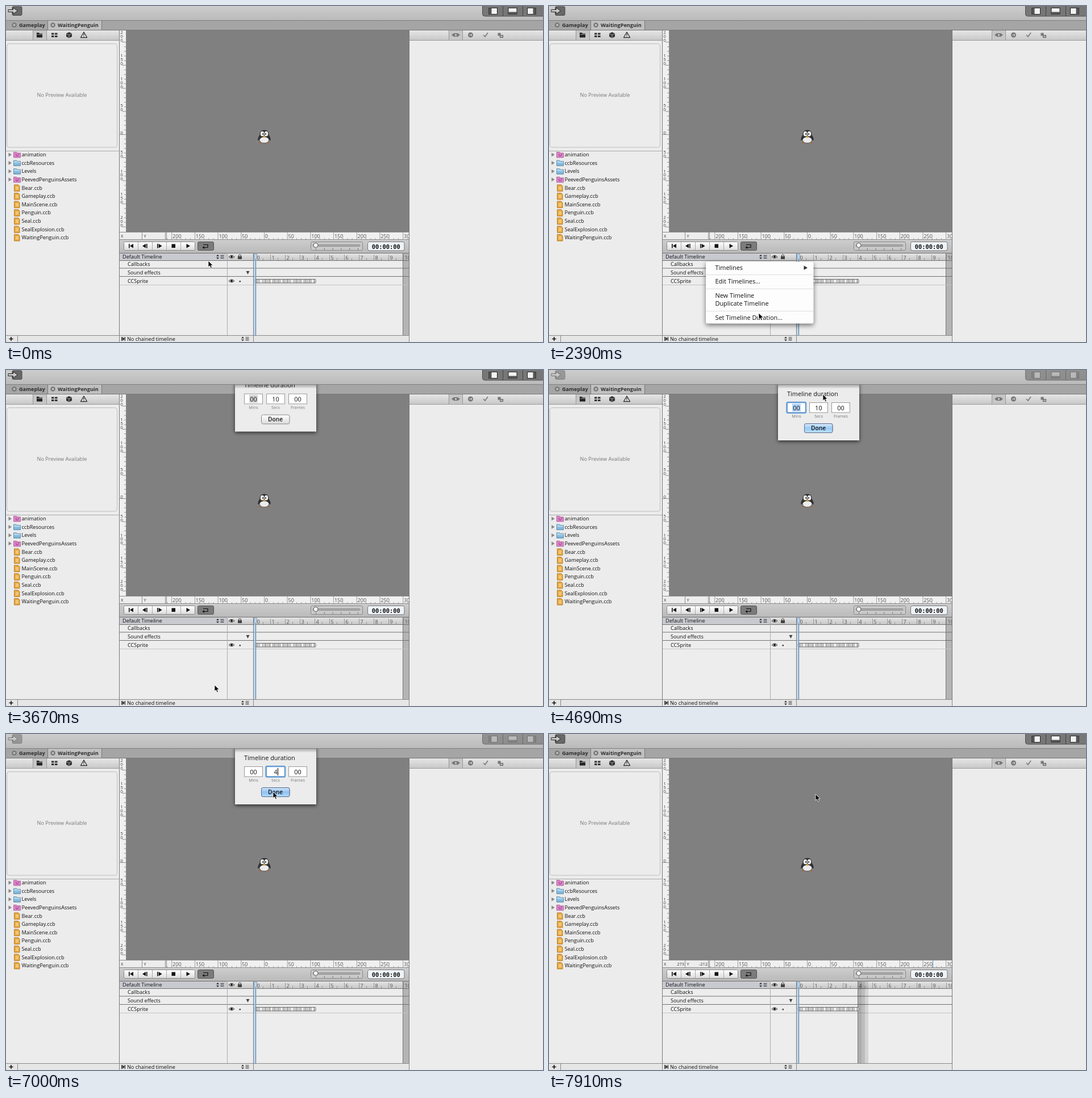
These frames come from a looping animation (945 px wide and 592 px high, 8000 ms). An HTML page:

```html
<!DOCTYPE html>
<html lang="en">
<head>
<meta charset="utf-8">
<title>Timeline duration</title>
<style>
html, body { margin: 0; width: 100%; height: 100%; overflow: hidden; background: #ececec; }
svg { display: block; width: 945px; height: 592px; }
text { font: 500 9.1px "Open Sans", "Noto Sans", sans-serif; fill: #111; white-space: pre; }
.b { font-weight: 700; fill: #2c2c2c; }
.mid { text-anchor: middle; }
.end { text-anchor: end; }
.dim { fill: #777; }
.rule { font-weight: 400; fill: #555; }
.digit { font-size: 8px; fill: #444; text-anchor: middle; }
.xy { font-size: 7.5px; fill: #333; }
.menu { font-size: 10.9px; }
.white text, .white path { fill: #fff; }
.small { font-size: 7.3px; fill: #777; text-anchor: middle; }
.done { font-size: 10.2px; font-weight: 600; text-anchor: middle; }
.mono { font: 700 10.4px "DejaVu Sans Mono", monospace; }

/* One loop is 8 s, so 1% is 80 ms */
.a { animation: 8s step-end infinite; }
.bar { animation-name: bar; }
#seg { animation-name: seg; }
#arrow { animation-name: arrow; }
#beam { animation-name: beam; }
#menu { animation-name: menu; }
#hi0 { animation-name: hi0; }
#hi1 { animation-name: hi1; }
#hi3 { animation-name: hi3; }
#hi4 { animation-name: hi4; }
#sheet { animation-name: sheet; }
#lip { animation-name: lip; }
#ring { animation-name: ring; }
#focus { animation-name: focus; }
#sel { animation-name: sel; }
#ten { animation-name: ten; }
#four { animation-name: four; }
#blue { animation-name: ring; }
#pulse { animation-name: pulse; }
#coords { animation-name: coords; }
#long { animation-name: long; }
#short { animation-name: short; }

@keyframes arrow {
  0% { transform: translate(356px, 449px); opacity: 1; }
  1.125% { transform: translate(351px, 450px); }
  3% { transform: translate(350px, 448px); }
  4.125% { transform: translate(349px, 446px); }
  5.25% { transform: translate(349px, 444px); }
  6.375% { transform: translate(349px, 443px); }
  25.5% { transform: translate(350px, 449px); }
  26.625% { transform: translate(354px, 466px); }
  27.75% { transform: translate(360px, 491px); }
  28.875% { transform: translate(366px, 520px); }
  29.875% { transform: translate(369px, 541px); }
  31% { transform: translate(369px, 549px); }
  32.25% { transform: translate(368px, 553px); }
  33.375% { transform: translate(367px, 555px); }
  50% { transform: translate(369px, 540px); }
  51.125% { transform: translate(376px, 490px); }
  52.25% { transform: translate(388px, 420px); }
  53.375% { transform: translate(404px, 340px); }
  54.375% { transform: translate(424px, 255px); }
  55.375% { transform: translate(444px, 175px); }
  56.5% { transform: translate(462px, 110px); }
  57.5% { transform: translate(475px, 65px); }
  58.625% { transform: translate(482px, 43px); }
  59.75% { transform: translate(483px, 60px); opacity: 1; }
  60.75% { transform: translate(473px, 67px); opacity: 0; }
  85.375% { transform: translate(472px, 78px); opacity: 1; }
  86.5% { transform: translate(471px, 92px); }
  87.5% { transform: translate(470px, 102px); }
  88.625%, 100% { transform: translate(469px, 106px); opacity: 1; }
}
@keyframes beam { 0% { opacity: 0; } 60.75% { opacity: 1; } 79.875%, 100% { opacity: 0; } }
@keyframes menu { 0% { opacity: 0; } 14.25% { opacity: 1; } 42.5%, 100% { opacity: 0; } }
@keyframes hi0 { 0% { opacity: 0; } 26.625% { opacity: 1; } 27.75%, 100% { opacity: 0; } }
@keyframes hi1 { 0% { opacity: 0; } 27.75% { opacity: 1; } 28.875%, 100% { opacity: 0; } }
@keyframes hi3 { 0% { opacity: 0; } 28.875% { opacity: 1; } 29.875%, 100% { opacity: 0; } }
@keyframes hi4 { 0% { opacity: 0; } 31% { opacity: 1; } 42.5%, 100% { opacity: 0; } }
@keyframes sheet {
  0% { transform: translateY(-120px); }
  43.625% { transform: translateY(-82px); }
  44.75% { transform: translateY(-44px); }
  45.875% { transform: translateY(-15.5px); }
  47% { transform: translateY(-3px); }
  48.125% { transform: none; }
  95.5% { transform: translateY(-8px); }
  96.625% { transform: translateY(-40px); }
  97.75% { transform: translateY(-84px); }
  98.875%, 100% { transform: translateY(-120px); }
}
@keyframes lip { 0% { opacity: 0; } 43.625% { opacity: 1; } 98.875%, 100% { opacity: 0; } }
@keyframes ring { 0% { opacity: 0; } 48.125%, 100% { opacity: 1; } }
@keyframes focus { 0% { transform: none; } 66.25%, 100% { transform: translateX(39px); } }
@keyframes sel { 0% { fill: #d0d0d0; opacity: 1; } 48.125% { fill: #b0d2f8; opacity: 1; } 79.875%, 100% { opacity: 0; } }
@keyframes ten { 0% { opacity: 1; } 79.875%, 100% { opacity: 0; } }
@keyframes four { 0% { opacity: 0; } 79.875%, 100% { opacity: 1; } }
@keyframes pulse {
  0% { opacity: 0; } 63% { opacity: .35; } 68.5% { opacity: .2; } 69.75% { opacity: .05; }
  74.375% { opacity: .2; } 76.5% { opacity: .35; } 79.875% { opacity: .15; } 83.125% { opacity: .3; }
  85.375% { opacity: .15; } 88.625% { opacity: .3; } 93%, 100% { opacity: 1; }
}
@keyframes bar { 0% { opacity: 1; } 48.125% { opacity: .5; } 98.875%, 100% { opacity: 1; } }
@keyframes seg { 0% { opacity: 1; } 48.125% { opacity: .7; } 98.875%, 100% { opacity: 1; } }
@keyframes coords { 0% { opacity: 0; } 52.25% { opacity: 1; } 57.5% { opacity: 0; } 98.875%, 100% { opacity: 1; } }
@keyframes long { 0% { opacity: 1; } 98.875%, 100% { opacity: 0; } }
@keyframes short { 0% { opacity: 0; } 98.875%, 100% { opacity: 1; } }
</style>
</head>
<body>
<svg viewBox="0 0 945 592" xmlns="http://www.w3.org/2000/svg">
  <defs>
    <linearGradient id="gTop" x2="0" y2="1"><stop stop-color="#cdcdcd"/><stop offset="1" stop-color="#bababa"/></linearGradient>
    <linearGradient id="gRow" x2="0" y2="1"><stop stop-color="#e6e6e6"/><stop offset="1" stop-color="#c8c8c8"/></linearGradient>
    <linearGradient id="gBtn" x2="0" y2="1"><stop stop-color="#fff"/><stop offset="1" stop-color="#dcdcdc"/></linearGradient>
    <linearGradient id="gBlue" x2="0" y2="1"><stop stop-color="#d9ebfc"/><stop offset=".5" stop-color="#9bcaf5"/><stop offset="1" stop-color="#b9e2fd"/></linearGradient>
    <linearGradient id="gDeep" x2="0" y2="1"><stop stop-color="#a5cbf3"/><stop offset=".5" stop-color="#5a9be8"/><stop offset="1" stop-color="#84bdf5"/></linearGradient>
    <linearGradient id="gHi" x2="0" y2="1"><stop stop-color="#5c85f4"/><stop offset="1" stop-color="#1f55ee"/></linearGradient>
    <linearGradient id="gFold" x2="0" y2="1"><stop stop-color="#a9d3ec"/><stop offset="1" stop-color="#74aed3"/></linearGradient>
    <linearGradient id="gLip" x2="0" y2="1"><stop stop-opacity=".28"/><stop offset="1" stop-opacity="0"/></linearGradient>
    <clipPath id="under"><path d="M200 26H709V400H200z"/></clipPath>
  </defs>

  <g id="base"></g>

  <g id="coords" class="a">
    <text class="xy end" x="238" y="407.5">273</text>
    <text class="xy end" x="279" y="407.5">-212</text>
    <path d="M675.5 399V411" stroke="#5b8fc4"/>
  </g>

  <g clip-path="url(#under)">
    <g id="sheet" class="a">
      <path d="M403 10H546V124H403z" fill="#ececec" style="filter:drop-shadow(0 2px 3px #000a)"/>
      <text class="menu" x="419" y="46.3">Timeline duration</text>
      <g id="fields"></g>
      <g id="focus" class="a">
        <rect id="ring" class="a" x="418.5" y="57" width="33.5" height="18.5" rx="2" fill="none" stroke="#629bd6" stroke-width="2.4"/>
        <rect id="sel" class="a" x="428" y="59.5" width="15" height="13.5"/>
      </g>
      <text class="menu mid" x="435.5" y="70.5">00</text>
      <g id="ten" class="a"><text class="menu mid" x="474.5" y="70.5">10</text></g>
      <g id="four" class="a"><text class="menu mid" x="474.5" y="70.5">4</text><path d="M478.5 60V73" stroke="#000"/></g>
      <text class="menu mid" x="513.5" y="70.5">00</text>
      <rect x="449.5" y="94.5" width="49.5" height="16" rx="3" fill="url(#gBtn)" stroke="#888"/>
      <rect id="blue" class="a" x="449.5" y="94.5" width="49.5" height="16" rx="3" fill="url(#gBlue)" stroke="#5d6c8c"/>
      <rect id="pulse" class="a" x="449.5" y="94.5" width="49.5" height="16" rx="3" fill="url(#gDeep)" stroke="#4a5a80"/>
      <text class="done" x="474" y="106.3">Done</text>
    </g>
    <path id="lip" class="a" d="M403 26H546V33H403z" fill="url(#gLip)"/>
  </g>

  <g id="menu" class="a"></g>

  <path id="beam" class="a" d="M470.5 61.5Q473 61.5 473.5 63Q474 61.5 476.5 61.5M473.5 63V72M470.5 73.5Q473 73.5 473.5 72Q474 73.5 476.5 73.5M472 68.5H475" fill="none" stroke="#111"/>
  <path id="arrow" class="a" d="M0 0V11L2.600 8.700L4.400 12.800L6.400 12L4.700 8H8.200z" fill="#000" stroke="#fff" stroke-width=".8"/>
</svg>
<script>
const $ = id => document.getElementById(id);
const out = [];
const add = s => out.push(s);
const box = (x, y, w, h, fill, more = '') => add(`<rect x="${x}" y="${y}" width="${w}" height="${h}" fill="${fill}" ${more}/>`);
const path = (d, fill, more = '') => add(`<path d="${d}" fill="${fill}" ${more}/>`);
const line = (d, color = '#888', w = 1) => path(d, 'none', `stroke="${color}" stroke-width="${w}"`);
const dot = (x, y, r, fill, more = '') => add(`<circle cx="${x}" cy="${y}" r="${r}" fill="${fill}" ${more}/>`);
const oval = (x, y, rx, ry, fill) => add(`<ellipse cx="${x}" cy="${y}" rx="${rx}" ry="${ry}" fill="${fill}"/>`);
const label = (x, y, s, cls = '') => add(`<text x="${x}" y="${y}" class="${cls}">${s}</text>`);
const flush = id => { $(id).innerHTML = out.join(''); out.length = 0; };

const eye = (x, y) => {
  path(`M${x - 5} ${y}Q${x} ${y - 5} ${x + 5} ${y}Q${x} ${y + 4.5} ${x - 5} ${y}z`, '#ddd', 'stroke="#333"');
  dot(x, y - .3, 2, '#222');
};
const sorter = (x, y) => {
  path(`M${x - 2.5} ${y - 1}h5l-2.5 -3zM${x - 2.5} ${y + 1}h5l-2.5 3z`, '#333');
  line(`M${x + 5} ${y - 2.5}h6m-6 2.5h6m-6 2.5h6`, '#333');
};

// Stage and its rulers
box(211, 43, 498, 355, '#808080');
box(200, 43, 11, 355, '#f0f0f0');
box(200, 398, 509, 13, '#f0f0f0');
const UNIT = 40.7;
for (let i = -20; i <= 21; i++) {
  const y = 226.5 + i * UNIT / 5;
  if (y > 44 && y < 397) line(`M${i % 5 ? 208 : i ? 205 : 199} ${y}H211`, '#777', .8);
}
for (let k = -4; k <= 4; k++) {
  const digits = String(Math.abs(k * 50)), y = 226.5 + k * UNIT;
  [...digits].forEach((d, i) => label(203.5, y - .6 - (digits.length - 1 - i) * 6.9, d, 'digit'));
}
for (let i = -21; i <= 31; i++) {
  const x = 454.5 + i * UNIT / 5;
  line(`M${x} ${i % 5 ? 409 : 399}V411`, '#888', .8);
}
for (let k = -4; k <= 6; k++) label(455.8 + k * UNIT, 408.8, Math.abs(k * 50), 'rule');
box(200, 399, 82, 12, '#ededed');
line('M239.5 399V411M280.5 399V411M282.5 399V411M199 398.5H709M199 411.5H709M211.5 43V398', '#8c8c8c');
label(202, 407.5, 'X', 'xy');
label(242.5, 407.5, 'Y', 'xy');

// Penguin
path('M446.5 227Q446 218.5 454.5 218.5Q463 218.5 462.5 227Q466.5 233 465.5 237L463 236Q462.5 241.5 454.5 241.5Q446.500 241.5 446 236L443.5 237Q442.5 233 446.5 227z', '#303033');
path('M446.5 235.5Q448 231 454.5 231Q461 231 462.5 235.5Q462 241 454.5 241Q447 241 446.5 235.5z', '#ececec');
oval(451, 225.2, 3.2, 4.4, '#f2f2f2');
oval(458, 225.2, 3.2, 4.4, '#f2f2f2');
dot(452.2, 225.5, 1.2, '#222');
dot(456.8, 225.5, 1.2, '#222');
path('M452 229.5L454.5 228L457 229.5L454.5 232.5z', '#c9a03a');
oval(447.5, 240.8, 2.4, 1.1, '#a0683a');
oval(461.5, 240.8, 2.4, 1.1, '#a0683a');

// Transport bar
box(200, 412, 509, 23, 'url(#gTop)');
box(207.5, 415.5, 125, 15, 'url(#gBtn)', 'stroke="#888" rx="2"');
line('M232.5 416V430M257.5 416V430M282.5 416V430M307.5 416V430', '#aaa');
path('M216 419h1.6v7.5h-1.6zM224 419v7.5l-6 -3.75zM246 419v7.5l-6 -3.75zM247 419h1.6v7.5h-1.6zM266 419h1.6v7.5h-1.6zM268.6 419v7.5l6 -3.75zM291.5 419.5h6.5v6.5h-6.5zM317.5 419v7.5l6.5 -3.75z', '#111');
box(337.5, 415.5, 28, 15, '#7b7b7b', 'stroke="#555" rx="2"');
line('M347 420.5H355V425.5H347', '#111', 1.2);
path('M349 423v5l-3.5 -2.5z', '#111');
box(536.5, 415.5, 91, 15, '#c9c9c9', 'stroke="#888" rx="2"');
box(540, 420.5, 83, 3, '#aaa', 'rx="1.5" stroke="#777" stroke-width=".6"');
for (let i = 0; i < 6; i++) line(`M${545.5 + i * 14.8} 427V429.5`, '#666');
dot(545, 421.5, 4, '#f6f6f6', 'stroke="#555"');
box(636.5, 415.5, 64.5, 15.5, '#edf3f6', 'stroke="#777" rx="3"');
label(668.8, 427.5, '00:00:00', 'mono mid');

// Timeline
box(200, 435, 509, 145, '#ededed');
box(200, 435, 509, 13, 'url(#gRow)');
box(200, 435, 189, 13, '#c9cad0');
add('<g id="long" class="a">');
box(699, 435, 10, 145, '#b4b4b4');
line('M698.5 435V580', '#777');
add('</g>');
for (let i = 0; i <= 10; i++) {
  const x = 439.5 + i * 26;
  line(`M${x} 438V448M${x + 13} 444V448`, '#888', .8);
  label(x + 2, 446.5, i, 'rule');
}
line('M200 435.5H709M200 448.5H709M200 462H709M200 476.5H709', '#707070');
line('M200 491.5H709', '#c4c4c4');
line('M389.5 435V580', '#aaa');
add('<g id="short" class="a">');
[[543, 7, .27], [550, 6, .2], [556, 6, .1]].forEach(([x, w, o]) => box(x, 436, w, 144, '#000', `opacity="${o}"`));
line('M543.5 436V580', '#777');
add('</g>');
label(205, 445.3, 'Default Timeline');
sorter(372.5, 442);
eye(397, 442);
box(408, 441, 7, 5, '#444');
line('M409.5 441V439.5Q411.5 436.5 413.5 439.5V441', '#444', 1.2);
label(214, 458.3, 'Callbacks');
label(214, 472.8, 'Sound effects');
label(214, 487.5, 'CCSprite');
path('M422.5 467h6l-3 6z', '#444');
eye(397, 484.5);
box(410.5, 484, 2.5, 2.5, '#444');
box(437.5, 481.5, 107.5, 6.5, '#f4f4f4', 'stroke="#666" rx="1"');
for (let i = 0; i < 40; i++) {
  if (i % 7 !== 3) line(`M${441 + i * 2.6} 481.5V488`, i % 3 ? '#777' : '#444', .9);
}
line('M435.5 435V592', '#777');
box(436.5, 440, 4, 140, '#a9c8e6', 'opacity=".75"');
line('M439.5 440V580', '#5f86ab');
path('M436.5 437h5v7l-2.5 4l-2.5 -4z', '#b9d4ee', 'stroke="#6a8bab" stroke-width=".7"');

// Right panel
box(709, 43, 236, 549, '#ececec');
box(710, 43, 235, 17, 'url(#gRow)');
box(779, 43, 24, 17, '#c6c6c6');
line('M709.5 43V592', '#777');
line('M779.5 43V60M803.5 43V60M710 60.5H945', '#999');
path('M784 51l4 -3h7l4 3l-4 3h-7z', '#777');
dot(791.5, 51, 1.5, '#ddd');
dot(817.5, 51, 4.5, '#777');
line('M815 51H819.5M818 49l2 2l-2 2', '#ddd');
line('M840 51l3 3l5 -7', '#777', 1.6);
box(865.5, 47.5, 5, 5, '#777');
box(869.5, 51.5, 5, 4, '#aaa', 'stroke="#666"');

// Left panel
box(0, 43, 199, 549, '#ececec');
box(0, 43, 199, 17, 'url(#gRow)');
box(47, 43, 24, 17, '#c6c6c6');
line('M47.5 43V60M71.5 43V60M0 60.5H199', '#999');
path('M54 47h4l1 1.5h5v7h-10z', '#222');
line('M55 50H64', '#ccc', .8);
[80, 86].forEach(x => [47.5, 52].forEach(y => box(x, y, 4.5, 3, '#333')));
path('M111 46l5 2.5v5.5l-5 2.5l-5 -2.5v-5.5z', '#333');
line('M106.5 49l4.5 2l4.5 -2M111 51V56', '#bbb', .8);
path('M137 46l5.5 9.5h-11z', '#eee', 'stroke="#333" stroke-width="1.4" stroke-linejoin="round"');
line('M137 49V52.5M137 53.3V54.5', '#222', 1.2);
box(1.5, 66.5, 194, 182.5, '#ececec', 'rx="4" stroke="#bdbdbd"');
label(98.5, 160.3, 'No Preview Available', 'mid dim');
line('M0 255.5H199', '#aaa');
line('M199.5 43V592', '#777');

const folders = ['animation', 'ccbResources', 'Levels', 'PeevedPenguinsAssets'];
const files = ['Bear', 'Gameplay', 'MainScene', 'Penguin', 'Seal', 'SealExplosion', 'WaitingPenguin'];
[...folders, ...files.map(f => f + '.ccb')].forEach((name, i) => {
  const y = 262 + i * 14.6;
  label(27.5, y + 3.2, name);
  if (i >= folders.length) {
    path(`M14.5 ${y - 5.5}h7l2.5 2.5v9h-9.5z`, '#e8a63a', 'stroke="#a87220" stroke-width=".8"');
    line(`M17 ${y - 1.5}h5m-5 2h5m-5 2h5`, '#fbe4b0');
    return;
  }
  const pink = i % 3 === 0;
  path(`M4.5 ${y - 3.5}v7l5.5 -3.5z`, '#888');
  path(`M13.5 ${y - 4.5}h5l1 1.5h6v8h-12z`, pink ? '#dd85c9' : 'url(#gFold)', `stroke="${pink ? '#a4528f' : '#4d82a8'}" stroke-width=".8"`);
  if (pink) {
    line(`M17 ${y + 1}q2.5 3 5 0`, '#7d2c69');
    dot(17.8, y - .8, .8, '#7d2c69');
    dot(21.7, y - .8, .8, '#7d2c69');
  } else line(`M14 ${y - 1.5}h11`, '#c9e5f5');
});

// Footer
box(0, 580, 199, 12, '#e6e6e6');
box(200, 580, 509, 12, '#e6e6e6');
line('M0 580.5H709', '#888');
line('M20.5 580V592M435.5 580V592M199.5 580V592M709.5 580V592', '#888');
line('M5.5 586.5H12.5M9 583V590', '#111', 1.6);
path('M203 583h1.3v7h-1.3zM205 583v7l3.5 -3.5zM208.6 583h1.3v7h-1.3z', '#222');
label(213, 589.8, 'No chained timeline');
sorter(416.5, 586.5);

// Window bar and tabs
box(0, 0, 945, 25, 'url(#gTop)');
box(0, 25, 945, 18, '#a5a5a5');
box(74, 26, 94, 17, '#c0c0c0');
line('M0 25.5H945', '#808080');
line('M0 42.5H945M73.5 26V42M168.5 26V42', '#777');
[14.5, 82.5].forEach(x => {
  dot(x, 33.5, 4.3, '#777');
  line(`M${x - 1.6} 31.9l3.2 3.2m0 -3.2l-3.2 3.2`, '#ddd', 1.1);
});
label(23, 37, 'Gameplay', 'b');
label(91, 37, 'WaitingPenguin', 'b');

// Window buttons, dimmed while the sheet is open
add('<g class="a bar">');
box(11, 1, 17, 15.5, '#686868', 'rx="2" stroke="#444"');
path('M4 6.5h8.5v-3.5l8 5.5l-8 5.5v-3.5h-8.5z', '#c9c9c9', 'stroke="#222"');
add('</g><g id="seg" class="a">');
box(838.5, -4, 110, 22, '#777', 'rx="4" stroke="#4c4c4c"');
line('M874.5 0V18M909.5 0V18', '#444');
add('<g class="a bar">');
[[849.5, 0, 0, 5, 11], [884, 0, 7, 15, 4], [917.5, 10, 0, 5, 11]].forEach(([x, dx, dy, w, h]) => {
  box(x, 3.5, 15, 11, '#f2f2f2', 'stroke="#222"');
  box(x + dx, 3.5 + dy, w, h, '#555');
});
add('</g></g>');
flush('base');

// Sheet fields
['Mins', 'Secs', 'Frames'].forEach((name, i) => {
  const x = 419 + i * 39;
  box(x + .5, 57.5, 32, 17.5, '#fff', 'stroke="#999"');
  label(x + 16.5, 83.5, name, 'small');
});
flush('fields');

// Popup menu: plain items, then a highlighted copy of each
const items = [['Timelines', 461], ['Edit Timelines...', 485.3], ['New Timeline', 509.6], ['Duplicate Timeline', 524.2], ['Set Timeline Duration...', 548.5]];
const item = ([name, y], i) => {
  label(292.5, y + 4, name, 'menu');
  if (!i) path(`M448.5 ${y - 3.5}v7.5l6.5 -3.75z`, '#333');
};
box(276, 450.5, 189.5, 109, '#fdfdfd', 'rx="3" style="filter:drop-shadow(0 3px 4px #0008)"');
line('M276 473.5H465.5M276 498.5H465.5M276 537.5H465.5', '#ddd');
items.forEach(item);
items.forEach((it, i) => {
  if (i === 2) return;
  add(`<g id="hi${i}" class="a white">`);
  box(276, it[1] - 7.5, 189.5, 14.8, 'url(#gHi)');
  item(it, i);
  add('</g>');
});
flush('menu');
</script>
</body>
</html>
```
